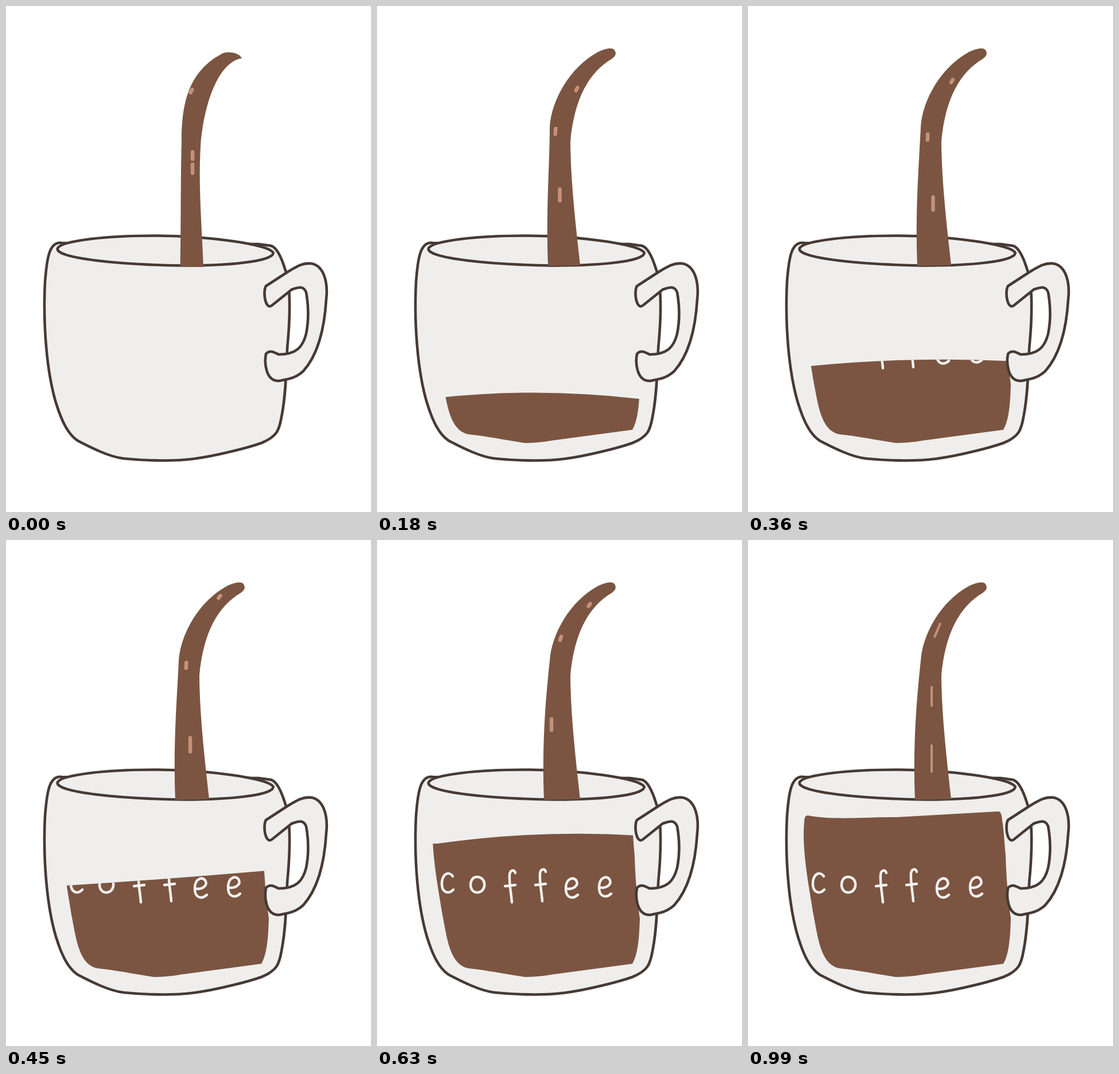
Write an HTML page that moves like this. It is 636x880 px and loops after 1.08 s.

```html
<!DOCTYPE html>
<html lang="en">
<head>
<meta charset="utf-8">
<title>Coffee cup</title>
<style>
  html, body { margin: 0; width: 100%; height: 100%; overflow: hidden; background: #fff; }
  svg { display: block; width: 100%; height: 100%; }
  .line { fill: #efeeec; stroke: #463a35; stroke-width: 4.6; stroke-linejoin: round; }
  .coffee { fill: #7b5541; }
  .word { fill: none; stroke: #f5f2f0; stroke-width: 4.4; stroke-linecap: round; stroke-linejoin: round; }
  #shine { stroke: #c4917a; stroke-linecap: round; }
</style>
</head>
<body>
<svg viewBox="0 0 636 880" role="img" aria-label="Coffee pours into a cup">
  <defs><clipPath id="level"><path id="surface"/></clipPath></defs>
  <!-- cup and rim -->
  <path class="line" d="M97 412C75 409 71 440 68 480C64 560 72 640 87 690C97 722 108 745 125 756
    C150 769 180 784 205 787C255 792 300 791 327 787.5C370 782 425 767 445 760C472 749 476 738 480 715
    C490 665 488 610 491 585C496 530 495 480 487 460C480 437 472 420 462 417L440 414Z"/>
  <path class="line" d="M90 421C98 408 175 399 265 399.5C350 400 457 414 465.5 429
    C468 441 410 451.5 310 451.5C200 450 83 439 90 421Z"/>
  <path id="stream" class="coffee"/>
  <g id="shine"></g>
  <g clip-path="url(#level)">
    <path class="coffee" d="M104 479C150 488 210 481 260 482L437 472Q442 473 443 488C446 505 447 530 449 550
      C450 590 454 630 458 658C457 685 456 718 445 737L325 753C300 756 285 760 258 760
      C225 755 190 748 160 745C126 739 122 690 114 652C108 612 93 540 98 490Q98 479 104 479Z"/>
    <g class="word" aria-label="coffee">
      <path d="M132 585C126 576 115 579 113 595C112 614 125 617 133 608"/>
      <path d="M173 586C160 587 159 612 174 613C191 613 192 587 175 586"/>
      <path id="f" d="M241 579C240 573 232 573 231 582C230 598 234 615 235 630M223 602L241 600"/>
      <use href="#f" x="53" y="-2"/>
      <path id="e" d="M330 606C340 609 351 602 348 594C344 584 330 588 329 604C328 622 340 626 350 617"/>
      <use href="#e" x="58" y="-2"/>
    </g>
  </g>
  <path class="line" d="M453 487L490 463C508 452 518 446 533 448C556 453 561 485 558 510
    C555 560 545 605 518 635C504 648 490 649 475 652C452 652 450 620 453 605C460 597 468 603 475 606
    C505 606 517 594 523 570C528 545 527 520 523 498C518 485 508 490 498 493L463 521
    C452 529 447 497 453 487Z"/>
</svg>
<script>
const STEP = 90, COUNT = 12;
const el = id => document.getElementById(id);

// Surface height at the left, middle and right, keyed by step.
const levels = {
  0: [790, 790, 790],
  1: [711, 703, 706],
  3: [652, 642, 660],
  5: [601, 589, 575],
  6: [580, 558, 547],
  7: [528, 512, 514],
  8: [460, 460, 460]
};

// Glint centres as x, y pairs, keyed by step.
const glints = {
  0: [323, 148, 325, 260, 325, 283],
  1: [357, 127, 310, 198, 313, 326],
  3: [339, 162, 312, 238, 324, 331, 312, 399],
  5: [372, 99, 314, 218, 321, 356],
  7: [370, 113, 320, 171, 304, 321],
  8: [330, 157, 320, 272, 320, 380],
  9: [374, 100, 316, 205, 318, 318],
  11: [330, 157, 320, 272, 320, 380]
};

// Values at a step, blended evenly between the nearest keys.
function at(keys, step) {
  const steps = Object.keys(keys).map(Number);
  const from = steps.filter(s => s <= step).pop();
  const to = steps.find(s => s > step) ?? from;
  const k = to > from ? (step - from) / (to - from) : 0;
  return k ? keys[from].slice(0, keys[to].length).map((v, i) => v + (keys[to][i] - v) * k) : keys[from];
}

const thinStream = `M303.5 453C305 380 304 300 306 235C306 165 320 112 378 82
  C390 78 407 82 411 91C375 95 345 160 339 245C335 310 341 380 344 454Z`;

// The left foot spreads as the pour gets stronger.
const fullStream = foot => `M${foot} 452C${foot - 4} 355 ${foot + 3} 275 301 210
  C304 165 335 107 385 80C397 74 411 71 414 77C418 83 415 88 409 92
  C370 115 344 160 337 235C337 300 346 380 354 451Z`;

function streamAt(step) {
  if (step === 0) return thinStream;
  return fullStream(step < 3 ? 298 : step < 7 ? 295 : 291);
}

function surfaceAt(step) {
  const [left, middle, right] = at(levels, step);
  return `M90 900V${left}H105Q280 ${2 * middle - (left + right) / 2} 455 ${right}H475V900Z`;
}

// Glints lean along the bend and lengthen as they fall.
function glint(x, y, thin) {
  const length = 5 + 1.5 * ((y - 90) / 75) ** 2 + (thin ? 18 : 0);
  const lean = Math.atan(Math.max(0, 230 - y) / 170);
  const dx = Math.sin(lean) * length / 2, dy = Math.cos(lean) * length / 2;
  return `<path d="M${x + dx} ${y - dy}L${x - dx} ${y + dy}" stroke-width="${thin ? 4 : 6.5}"/>`;
}

function shineAt(step) {
  const points = at(glints, step);
  let marks = '';
  for (let i = 0; i < points.length; i += 2) marks += glint(points[i], points[i + 1], step > 7);
  return marks;
}

function draw(time) {
  const step = Math.floor(time / STEP) % COUNT;
  el('stream').setAttribute('d', streamAt(step));
  el('surface').setAttribute('d', surfaceAt(step));
  el('shine').innerHTML = shineAt(step);
}

const start = performance.now();
function tick() {
  draw(performance.now() - start);
  requestAnimationFrame(tick);
}
tick();
</script>
</body>
</html>
```
